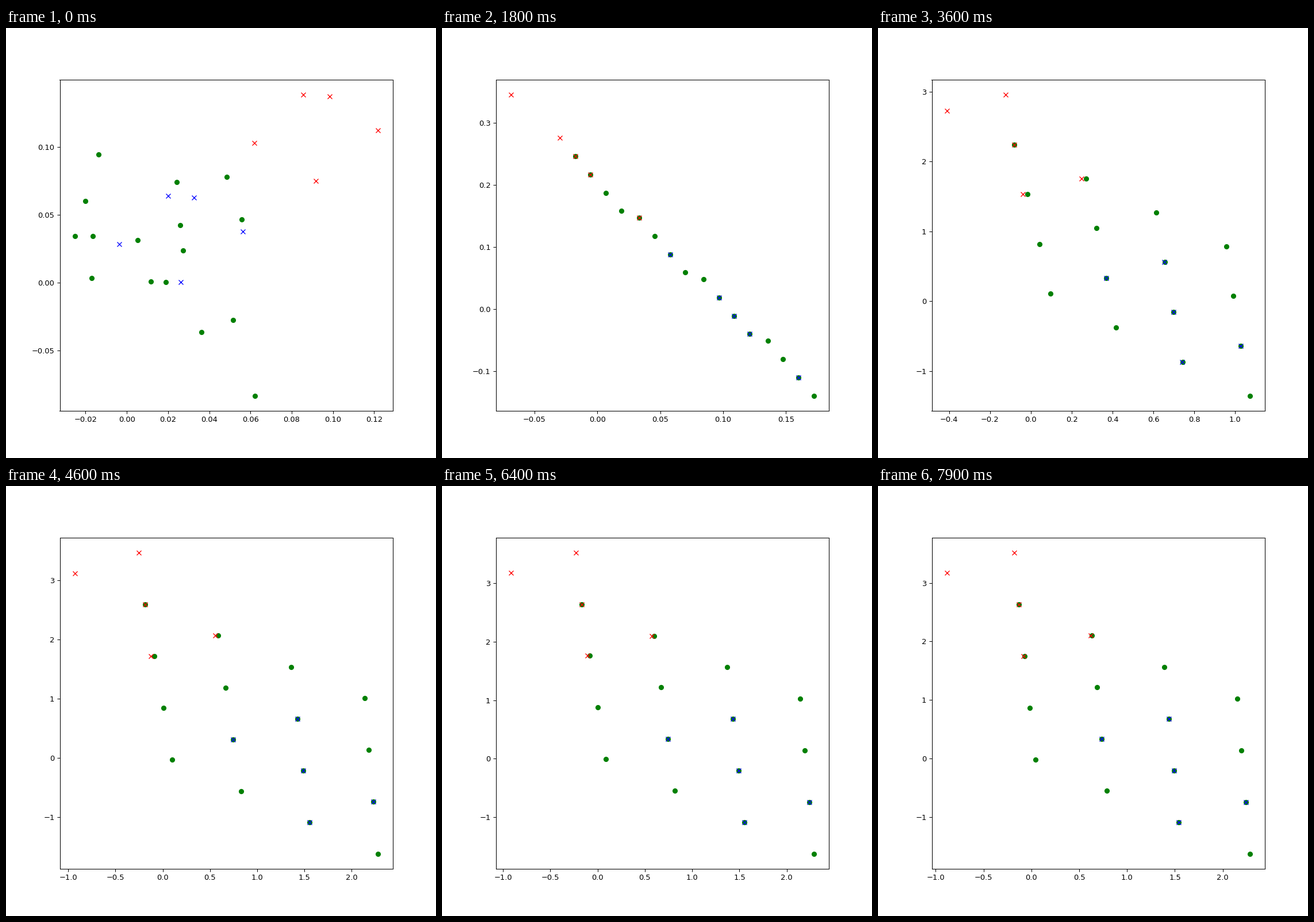
Write a matplotlib script that moves like this. It is 748 px wide and 748 px high and loops after 8000 ms.

```python
import numpy as np
import matplotlib.pyplot as plt
from matplotlib.animation import FuncAnimation

STAGE, INCHES = 748, 8
STEP, FRAMES = 100, 80
SIDE = 4
CORNER, HUB = 0, 10   # cells the red and blue predictions start from


def scatter():
    """Untrained state: a random cloud held by a few key points."""
    rng = np.random.default_rng(4)
    cloud = rng.normal((0.019, 0.027), (0.022, 0.03), (SIDE * SIDE, 2))
    cells = np.clip(cloud, (-0.02, -0.045), (0.076, 0.1))
    cells[CORNER] = 0.0486, 0.0779
    cells[HUB] = -0.017, 0.0031
    cells[2] = -0.0252, 0.0341
    cells[-1] = 0.0622, -0.0835
    moves = [(-0.0038, 0.0283), (0.0201, 0.0639), (0.0327, 0.0627),
             (0.0562, 0.0377), (0.0262, 0.0002)]
    return np.vstack([cells, moves])


def lattice(mid, u, v, curl=0, twist=0):
    """Grid with column step u and row step v; curl and twist bend x."""
    i, j = np.divmod(np.arange(SIDE * SIDE), SIDE) - np.array([[1.5], [1.5]])
    cells = np.array(mid) + np.outer(i, u) + np.outer(j, v)
    cells[:, 0] += curl * (i + j) ** 3 + twist * i * j
    du = (cells[HUB + SIDE] - cells[HUB - SIDE]) / 2
    dv = (cells[HUB + 1] - cells[HUB - 1]) / 2
    moves = cells[HUB] + np.array([-du, -dv, 0 * du, dv, du])
    return np.vstack([cells, moves])


def linear(s):
    return s


def settle(s):
    return 1 - (1 - s) ** 2.5


def grow(s, rate=1.4):
    return np.expm1(rate * s) / np.expm1(rate)


def smooth(s):
    return s * s * (3 - 2 * s)


# time, pose, easing in x and y towards the next pose
KEYS = [
    (0, scatter(), settle, settle),
    (1100, lattice((0.079, 0.051), (0.0491, -0.0952), (0.0117, -0.02)),
     linear, linear),
    (1800, lattice((0.0773, 0.0531), (0.0511, -0.0991), (0.0122, -0.0294)),
     grow, grow),
    (2800, lattice((0.102, 0.3), (0.0315, -0.344), (0.0254, -0.174),
                   curl=0.0008), smooth, settle),
    (4600, lattice((1.082, 0.49), (0.75, -0.529), (0.072, -0.875),
                   twist=-0.0165), linear, linear),
    (6400, lattice((1.085, 0.508), (0.752, -0.539), (0.067, -0.882),
                   twist=-0.012), linear, linear),
    (7900, lattice((1.087, 0.503), (0.754, -0.536), (0.051, -0.884),
                   twist=-0.005), linear, linear),
]


def state(t):
    for (t0, a, ease_x, ease_y), (t1, b, *_) in zip(KEYS, KEYS[1:]):
        if t <= t1:
            s = (t - t0) / (t1 - t0)
            return a + np.array([ease_x(s), ease_y(s)]) * (b - a)


fig, ax = plt.subplots(figsize=(INCHES, INCHES), dpi=STAGE / INCHES)
dots, = ax.plot([], [], "o", color="green")
blue, = ax.plot([], [], "x", color="blue")
red, = ax.plot([], [], "x", color="red")


def update(frame):
    cells, moves = np.split(state(frame * STEP), [SIDE * SIDE])
    dots.set_data(*cells.T)
    blue.set_data(*moves.T)
    red.set_data(*(moves + cells[CORNER] - cells[HUB]).T)
    ax.relim()
    ax.autoscale_view()
    return dots, blue, red


anim = FuncAnimation(fig, update, frames=FRAMES, interval=STEP, repeat=True)
plt.show()
```
